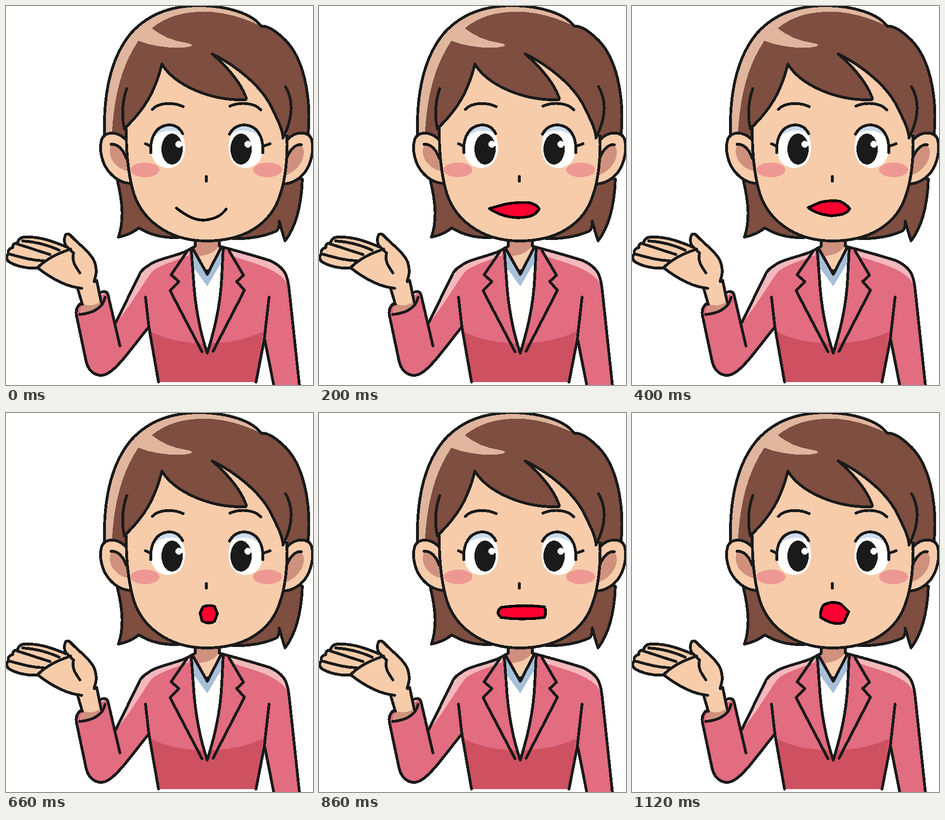
Write an HTML page without scripts that moves like this. It is 636x784 px and loops after 1200 ms.

```html
<!DOCTYPE html>
<html lang="en">
<head>
<meta charset="utf-8">
<title>Presenter talking</title>
<style>
html, body { margin: 0; width: 100%; height: 100%; overflow: hidden; background: #fff; }
svg { display: block; width: 100vw; height: 100vh; shape-rendering: crispEdges; }
.line { fill: none; stroke: #1a1a1a; stroke-width: 5.8; stroke-linecap: round; stroke-linejoin: round; }
.line.skin, .skin { fill: #f6ccab; }
.shade { fill: #cf917d; }
.hair { fill: #7e4e40; }
.shine { fill: #e0b59e; }
.suit { fill: #e26c80; }
.suit-dark { fill: #cd5160; }
.suit-light { fill: #f3b8bc; }
.white { fill: #fffffe; }
.blue { fill: #a7bfd8; }
.lid { fill: #cbdcec; }
.ink { fill: #1a1a1a; }
.cheek { fill: #ee9894; }

/* each pose is visible for one 100 ms slot, numbered by --i */
.mouth path { fill: #ff0030; stroke: #000; stroke-width: 5.5; stroke-linejoin: round; stroke-linecap: round; }
.mouth .smile { fill: none; }
.mouth .grin { fill: #ff0018; }
.shut { fill: none; stroke: #000; stroke-width: 8; stroke-linecap: round; stroke-linejoin: round; }
.mouth path, .shut {
  visibility: hidden;
  animation: slot 1.2s step-end infinite;
  animation-delay: calc((var(--i) - 12) * 100ms);
}
.mouth .last { animation-name: hold; }
.open { animation: blink 1.2s step-end infinite; }
@keyframes slot { 0% { visibility: visible; } 8.3333%, 100% { visibility: hidden; } }
@keyframes hold { 0% { visibility: visible; } 16.6666%, 100% { visibility: hidden; } }
@keyframes blink { 0% { visibility: visible; } 41.6666% { visibility: hidden; } 50%, 100% { visibility: visible; } }
</style>
</head>
<body>
<svg viewBox="0 0 636 784" preserveAspectRatio="none">
  <!-- lower hair -->
  <g class="line">
    <path class="hair" d="M231 362C240 400 246 440 233 478Q258 473 275 459C300 474 325 480 357 479L380 420L250 350Z"/>
    <path class="hair" d="M614 358C612 410 602 455 578 486Q572 467 566 445Q567 458 561 465C535 477 505 482 470 481L480 400L580 350Z"/>
  </g>

  <!-- neck and shirt -->
  <path class="skin" d="M392 480H442L447 505L417 555L387 505Z"/>
  <path class="shade" d="M393 484H441V497C431 511 415 517 396 517L388 505Z"/>

  <!-- jacket -->
  <path class="suit" d="M390 498L372 508C345 519 308 525 295 537Q284 543 278 552L228 654L211 592L155 614Q142 626 147 645L166 735C172 760 192 770 211 760C235 746 266 700 296 664L316 778H518L536 690L555 784H608L587 590C584 560 580 541 545 526Q500 512 445 497L417 550Z"/>
  <path class="suit-dark" d="M301 674C360 706 470 706 533 673L518 778H316Z"/>
  <path class="suit-light" d="M383 503L372 508C345 519 308 525 295 537Q284 543 278 552L228 656C262 614 284 574 302 550C315 537 345 529 378 516ZM455 500Q500 512 545 526C572 538 580 552 582 574C565 546 530 537 468 517Z"/>
  <path class="white" d="M386 506L417 553L448 503L447 560C444 625 430 675 418 717C404 680 392 630 388 560Z"/>
  <path class="blue" d="M386 506L417 554L448 503L446 531L417 580L388 540Z"/>
  <g class="line">
    <path d="M392 486V497L372 508C345 519 308 525 295 537Q284 543 278 552L228 654"/>
    <path d="M442 486V497Q500 512 545 526C580 541 584 560 587 590L608 786"/>
    <path d="M289 602L296 664L316 778M545 602L535 690L518 778M536 690L555 786"/>
    <path d="M375 508L342 556L358 570L340 589L406 715M462 506L492 557L478 570L494 588L429 714"/>
    <path d="M384 506L388 560C392 630 404 680 417 718C430 675 444 625 447 560L450 501"/>
    <path d="M388 504L417 555L445 501"/>
  </g>
  <circle class="ink" cx="417" cy="550" r="5"/>

  <!-- raised hand -->
  <path class="skin" d="M149 584L158 617L154 637Q190 634 200 610L189 570Z"/>
  <path class="shade" d="M158 616Q180 624 197 611L202 613Q188 635 155 638Z"/>
  <g class="line">
    <path d="M149 586L158 617M188 568L197 612"/>
    <path d="M197 592Q206 589 210 594L212 600L236 703"/>
    <path d="M157 614Q141 624 147 645L166 735C172 760 192 770 211 760C235 746 266 700 295 665"/>
    <path d="M153 638C180 636 201 624 205 603"/>
    <path class="skin" d="M157 584C128 581 100 568 66 542C45 544 20 538 6 529C0 524 0 517 5 513Q2 503 14 500Q13 491 24 490Q27 477 42 478C70 477 98 487 124 498C121 490 120 481 123 474Q128 468 135 476C150 492 179 513 184 531C191 555 183 562 183 570"/>
    <path d="M66 541C80 526 105 512 134 503M35 486C62 488 86 494 110 505M19 491C45 499 68 507 91 514M6 513C30 519 50 526 77 527"/>
    <path d="M124 495Q128 501 140 511C135 529 146 541 153 552"/>
  </g>

  <!-- hair cap -->
  <path class="shine" d="M204 268C202 190 213 110 260 55C298 14 345 0 400 -1C460 0 510 16 529 42C545 40 565 57 580 72C614 107 633 180 626 265Z"/>
  <path class="hair" d="M219 275C222 200 235 130 274 72C310 86 360 90 384 83Q389 79 372 76C345 72 322 62 302 46C335 19 375 10 425 12C470 16 502 29 529 42C545 40 565 57 580 72C614 107 633 180 626 275Z"/>
  <path class="line" d="M204 268C202 190 213 110 260 55C298 14 345 0 400 -1C460 0 510 16 529 42C545 40 565 57 580 72C614 107 633 180 626 263"/>

  <!-- ears -->
  <path class="line skin" d="M246 274C226 257 203 261 198 277C192 300 200 325 211 340C225 358 240 366 257 367L300 320Z"/>
  <path class="line skin" d="M584 275C600 259 625 258 633 275C639 300 632 325 620 343C606 361 590 367 577 368L540 320Z"/>
  <path class="shade" d="M218 287C209 305 220 335 254 342L249 313C240 297 230 288 218 287ZM612 288C624 300 615 338 579 350L582 314Q592 293 612 288Z"/>
  <path class="line" d="M218 286C232 285 243 297 249 315M612 287C600 285 588 297 581 316"/>

  <!-- face -->
  <path class="skin" d="M249 252C285 216 308 180 323 120C348 162 420 196 495 194Q500 193 496 186C488 165 467 133 427 99C480 125 525 165 545 200C563 235 573 255 574 273L583 262C584 312 579 360 567 393C550 446 500 486 415 486C335 486 277 440 262 378C252 340 249 300 249 252Z"/>
  <g class="line">
    <path d="M249 255C249 300 252 340 262 378C277 440 335 486 415 486C500 486 550 446 567 393C579 360 584 312 582 268"/>
    <path d="M250 171C242 195 239 225 245 254C285 216 308 180 323 120C348 162 420 196 495 194Q500 193 496 186C488 165 467 133 427 99C480 125 525 165 545 200C563 235 573 255 574 273C594 232 597 197 579 167"/>
    <path d="M303 214C315 200 345 198 367 208M464 207C485 198 515 200 528 215M415 353V362"/>
  </g>
  <g class="cheek">
    <ellipse cx="288" cy="339" rx="30" ry="15"/>
    <ellipse cx="542" cy="339" rx="30" ry="15"/>
  </g>

  <!-- eyes -->
  <g class="open">
    <path class="white" d="M300 300C298 270 312 246 340 246C360 247 371 270 371 293C371 320 356 335 337 335C318 335 303 324 300 300ZM532 300C534 270 520 246 492 246C472 247 461 270 461 293C461 320 476 335 495 335C514 335 529 324 532 300Z"/>
    <path class="lid" d="M307 270C313 252 325 246 340 246Q356 247 365 265C350 254 325 255 307 270ZM525 270C519 252 507 246 492 246Q476 247 467 265C482 254 507 255 525 270Z"/>
    <g class="ink">
      <ellipse cx="344" cy="296" rx="22" ry="32"/>
      <ellipse cx="487" cy="296" rx="22" ry="32"/>
    </g>
    <g class="white">
      <circle cx="358" cy="286" r="7"/>
      <circle cx="501" cy="286" r="7"/>
    </g>
    <path class="line" d="M300 303C298 270 312 246 340 246Q358 247 366 264M289 285L300 290M532 303C534 270 520 246 492 246Q473 247 463 265M547 285L533 290"/>
  </g>
  <path class="shut" style="--i:5" d="M300 277L314 276M306 291C315 272 326 267 346 266C366 265 377 273 391 291M463 294C468 278 479 268 491 268C507 269 514 283 528 292M515 283L528 277"/>

  <!-- mouth -->
  <g class="mouth">
    <path class="smile" style="--i:0" d="M353 418C380 439 395 443 410 443C435 441 448 432 456 420"/>
    <path class="grin" style="--i:1" d="M354 419C385 417 405 412 440 412Q456 414 456 421C450 436 430 442 408 442C385 441 368 430 354 419Z"/>
    <path style="--i:2" d="M353 419L385 410Q412 405 437 407Q454 412 456 420C448 434 437 437 412 438C387 437 366 428 353 419Z"/>
    <path style="--i:3" d="M353 418L385 404Q412 399 434 403Q449 409 456 419C449 431 442 434 415 435C390 434 365 427 353 418Z"/>
    <path style="--i:4" d="M365 417L390 406Q413 401 431 404Q444 410 451 419C445 430 436 432 413 434C394 432 375 426 365 417Z"/>
    <path style="--i:5" d="M377 416L396 407Q415 403 428 406Q440 411 446 419Q440 428 430 430Q412 434 400 430Q385 424 377 416Z"/>
    <path style="--i:6" d="M402 414L408 401Q420 396 432 400L438 415L432 431Q420 438 406 430Z"/>
    <path style="--i:7" d="M393 402Q420 396 449 401Q455 413 449 427Q420 433 392 427Q384 413 393 402Z"/>
    <path style="--i:8" d="M378 402Q420 396 467 401Q472 411 467 423Q420 429 377 423Q364 412 378 402Z"/>
    <path style="--i:9" d="M387 400Q418 392 451 399Q462 411 453 428Q419 434 384 423Q377 410 387 400Z"/>
    <path class="last" style="--i:10" d="M397 397Q417 387 434 396L449 411L439 433Q418 441 391 423Q389 408 397 397Z"/>
  </g>
</svg>
</body>
</html>
```
